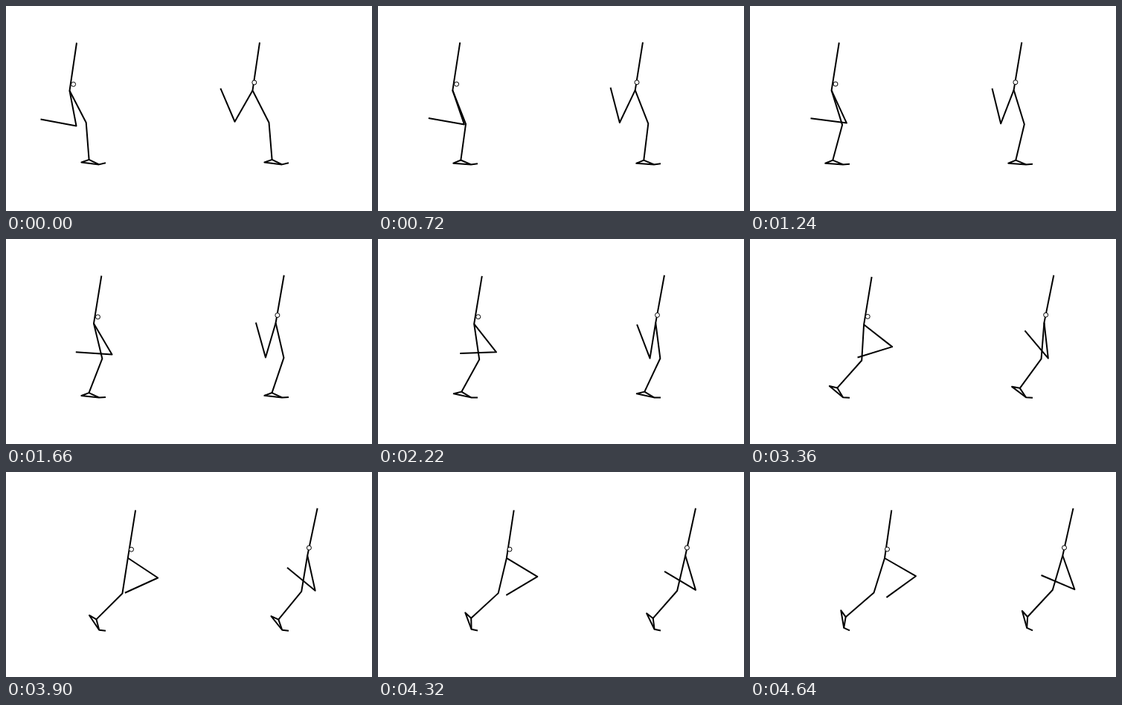
Recreate the animation shown at these times as an HTML page with a canvas. Size 492 px wide and 276 px high, loop 4660 ms.

```html
<!DOCTYPE html>
<html lang="en">
<head>
<meta charset="utf-8">
<title>Walking stick figures</title>
<style>
  html, body { margin: 0; width: 100%; height: 100%; overflow: hidden; background: #fff; }
  canvas { display: block; }
</style>
</head>
<body>
<canvas id="stage" width="492" height="276"></canvas>
<script>
const ctx = document.getElementById('stage').getContext('2d');
const LOOP = 4660, LAST_STEP = 100;
const THIGH = 48.4, SHANK = 48.8, TRUNK = 65.2;

// Each track lists evenly spaced key values over the stride; angles in degrees.
const figures = [
  {
    left: 0,
    topX: [95, 190.3],
    massX: [90.6, 184.5], massY: [105.4, 104],
    hipX: [85.5, 116.4, 147.9, 181], hipY: [114, 113.8, 115.1, 116],
    kneeX: [107.7, 128.4, 147.2, 166.5], kneeY: [157, 160.9, 163.4, 162.5],
    thigh: [10.7, 29.4, 49.4, 60],
    shank: [100.6, 94.7, 76.4, 54],
    foot: [7, 3.9, 14.7, 44.3, 80.5]
  },
  {
    left: 246,
    topX: [95, 188.5],
    massX: [87.8, 176.5], massY: [103, 101.9],
    hipX: [85.5, 174.3], hipY: [113.7, 112.8, 112.5],
    kneeX: [107.5, 126.6, 142.9, 160.8], kneeY: [157, 159.8, 161.4, 158.8],
    thigh: [-29.7, -17.3, 3.2, 19.4],
    shank: [156.9, 166.3, 157.3, 137.2, 113.1],
    foot: [7, 3.9, 14.6, 41, 74.5]
  }
];

// Polynomial through evenly spaced keys: two give a line, three a parabola, ...
function curve(keys, u) {
  const s = u * (keys.length - 1);
  return keys.reduce((sum, key, i) =>
    sum + keys.reduce((term, _, j) => i === j ? term : term * (s - j) / (i - j), key), 0);
}

// Point at distance r and angle from straight down, positive to the right.
function reach([x, y], r, degrees) {
  const a = degrees * Math.PI / 180;
  return [x + r * Math.sin(a), y + r * Math.cos(a)];
}

function polyline(...points) {
  ctx.beginPath();
  points.forEach(p => ctx.lineTo(...p));
  ctx.stroke();
}

function drawFigure(fig, u) {
  const at = track => curve(fig[track], u);

  const hip = [at('hipX'), at('hipY')];
  const topX = at('topX');
  const top = [topX, hip[1] - Math.sqrt(TRUNK ** 2 - (topX - hip[0]) ** 2)];
  const knee = [at('kneeX'), at('kneeY')];
  const swingKnee = reach(hip, THIGH, at('thigh'));
  const swingAnkle = reach(swingKnee, SHANK, -at('shank'));

  // The ball of the foot leaves the ground only at push-off.
  const lift = u ** 9;
  const ball = [125 + 1.2 * lift, 213.4 - 3.5 * lift];
  const toe = [134, curve([211.2, 213.5, 213.3], u)];
  const footAngle = -90 - at('foot');
  const heel = reach(ball, 23.8, footAngle);
  const ankle = reach(ball, 14.9, footAngle - 19);

  ctx.save();
  ctx.translate(fig.left, 0);
  ctx.lineWidth = 2;
  polyline(top, hip, knee, ankle, heel, ball, toe);
  polyline(ankle, ball);
  polyline(hip, swingKnee, swingAnkle);

  ctx.lineWidth = 1;
  ctx.beginPath();
  ctx.arc(at('massX'), at('massY'), 3, 0, 2 * Math.PI);
  ctx.fill();
  ctx.stroke();
  ctx.restore();
}

// Three steps every 140 ms, at 0, 20 and 120 ms.
function stepAt(ms) {
  const r = ms % 140;
  return 3 * Math.floor(ms / 140) + (r >= 20) + (r >= 120);
}

function draw() {
  const u = stepAt(performance.now() % LOOP) / LAST_STEP;
  ctx.fillStyle = '#fff';
  ctx.strokeStyle = '#000';
  ctx.lineJoin = 'round';
  ctx.fillRect(0, 0, 492, 276);
  figures.forEach(fig => drawFigure(fig, u));
  requestAnimationFrame(draw);
}
draw();
</script>
</body>
</html>
```
